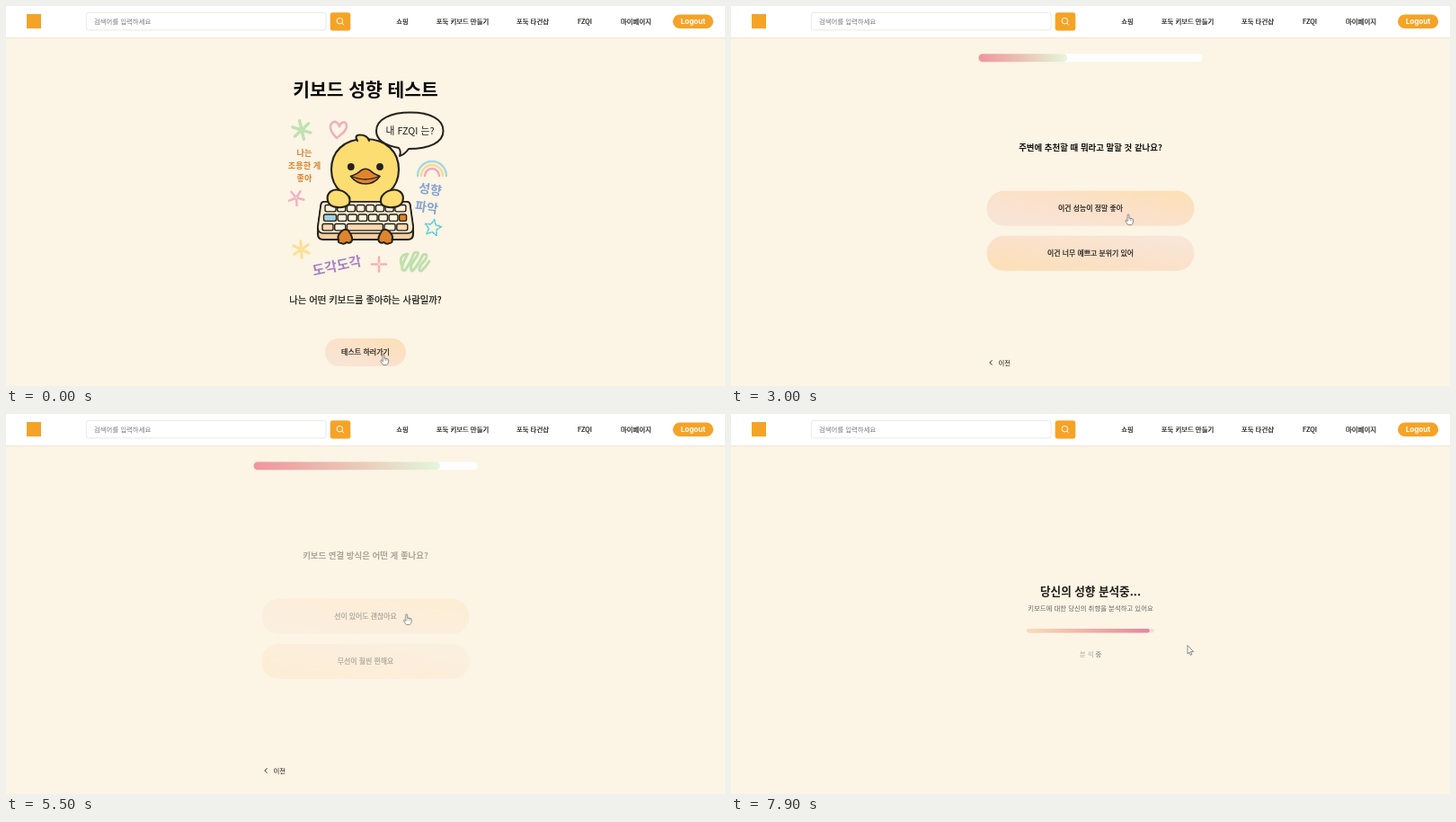
These frames come from a looping animation (800x423 px, 8 s). An HTML page:

```html
<!DOCTYPE html>
<html lang="ko">
<head>
<meta charset="utf-8">
<title>키보드 성향 테스트</title>
<style>
html, body { margin: 0; width: 100%; height: 100%; overflow: hidden; background: #fcf4e4; }
svg { display: block; width: 100%; height: 100%; }
text { font-family: "Noto Sans CJK KR", "Noto Sans CJK", sans-serif; }
.latin { font-family: Inter, sans-serif; }
</style>
</head>
<body>
<svg id="stage" viewBox="0 0 800 423" xmlns="http://www.w3.org/2000/svg"></svg>
<script>
const LOOP = 8000, STEP = 100;
const INK = '#1f1d1b', ORANGE = '#f5a326', LINE = '#25211d', PAPER = '#fcf4e4';

// start time, question, first answer, second answer
const QUESTIONS = [
  [600, '타건음이 잘 들릴 때 집중이 잘 되나요?', '아니요, 조용한 게 더 좋아요', '네, 찰칵찰칵 소리가 좋아요'],
  [1400, '키보드를 고를 때 먼저 보는 것은?', '손에 편한 타건감이에요', '눈에 띄는 디자인이에요'],
  [1900, '조용한 키보드와 반짝이는 키보드 중 고른다면?', '조용한 키보드가 더 좋아요', '시각적으로 화려한 게 더 좋아요'],
  [2400, '새 키보드를 사면 무엇부터 하나요?', '바로 타이핑을 해봐요', '예쁘게 사진을 찍어요'],
  [2800, '주변에 추천할 때 뭐라고 말할 것 같나요?', '이건 성능이 정말 좋아', '이건 너무 예쁘고 분위기 있어'],
  [3300, '키보드를 주로 어디에서 사용하나요?', '사무실에서 사용해요', '내 방에서 사용해요'],
  [3700, '키캡을 바꿔보고 싶은 적이 있나요?', '기본 키캡이면 충분해요', '색깔별로 바꾸고 싶어요'],
  [4200, '거치대, 데스크패드, 무드등... 이런 것들', '없어도 괜찮아요', '있어야 책상이 완성된 느낌이에요'],
  [4700, '키를 누르는 느낌은 어떤 게 좋나요?', '가볍고 부드러운 느낌', '묵직하고 또렷한 느낌'],
  [5100, '키보드의 크기는 어떤 게 좋나요?', '작고 간편한 게 좋아요', '숫자키까지 있어야 해요'],
  [5500, '키보드 연결 방식은 어떤 게 좋나요?', '선이 있어도 괜찮아요', '무선이 훨씬 편해요'],
  [5900, '나에게 키보드란 어떤 의미인가요?', '일을 돕는 도구예요', '나를 보여주는 취향이에요']
];
const RESULT = 6300;

// time, x, y of the pointer tip
const PATH = [[0, 420, 388], [500, 420, 388], [700, 421, 382], [1000, 421, 379], [1300, 426, 282],
  [1400, 427, 274], [1900, 429, 272], [2200, 431, 251], [2400, 436, 240], [2800, 442, 233],
  [3000, 442, 232], [3800, 444, 225], [4500, 445, 221], [6200, 446, 224], [6400, 449, 235],
  [7000, 470, 250], [7900, 508, 258]];

const clamp = v => Math.max(0, Math.min(1, v));
const easeOut = p => 1 - (1 - clamp(p)) ** 2;

// weight 500 gets a hairline stroke to look medium
const text = (s, x, cy, size, fill = INK, weight = 500, anchor = 'middle', extra = '') =>
  `<text x="${x}" y="${cy + size * .37}" font-size="${size}" font-weight="${weight}" fill="${fill}" text-anchor="${anchor}" ` +
  (weight === 500 ? `stroke="${fill}" stroke-width=".22" ` : '') + `${extra}>${s}</text>`;
const rect = (x, y, w, h, r, fill, extra = '') =>
  `<rect x="${x}" y="${y}" width="${w}" height="${h}" rx="${r}" fill="${fill}" ${extra}/>`;
const ellipse = (x, y, rx, ry, fill) =>
  `<ellipse cx="${x}" cy="${y}" rx="${rx}" ry="${ry}" fill="${fill}"/>`;
const path = (d, stroke, w, fill = 'none', extra = '') =>
  `<path d="${d}" stroke="${stroke}" stroke-width="${w}" fill="${fill}" stroke-linecap="round" stroke-linejoin="round" ${extra}/>`;
const gradient = (id, dir, ...colors) =>
  `<linearGradient id="${id}" ${dir}>` +
  colors.map((c, i) => `<stop offset="${i / (colors.length - 1)}" stop-color="${c}"/>`).join('') +
  '</linearGradient>';

function spokes(x, y, r, n, color, w, turn = 0) {
  let d = '';
  for (let i = 0; i < n; i++) {
    const a = turn + i * 2 * Math.PI / n, c = Math.cos(a), s = Math.sin(a);
    d += `M${x + c * 2} ${y + s * 2}L${x + c * r} ${y + s * r}`;
  }
  return path(d, color, w);
}

function star(x, y, r) {
  const points = [];
  for (let i = 0; i < 10; i++) {
    const a = -1.4 + i * Math.PI / 5, k = i % 2 ? r * .48 : r;
    points.push(`${x + Math.cos(a) * k} ${y + Math.sin(a) * k}`);
  }
  return path(`M${points.join('L')}Z`, '#55cbd8', 1.6, 'none', 'stroke-dasharray="2.4 1.8"');
}

function keyRow(y, x, widths, tints) {
  return widths.map((w, i) => {
    const key = rect(x, y, w, 7.4, 1.8, tints[i] || '#fdf1da', `stroke="${LINE}" stroke-width="1.4"`);
    x += w + 1.7;
    return key;
  }).join('');
}

function header() {
  const nav = [['쇼핑', 441], ['포둑 키보드 만들기', 508], ['포둑 타건샵', 586], ['FZQI', 644], ['마이페이지', 701]];
  return rect(0, 35, 800, 1.3, 0, '#f0e9dc') + rect(0, 0, 800, 35, 0, '#fff') +
    rect(23, 9, 16, 16, 0, ORANGE) +
    rect(89.3, 7.4, 266.8, 19.4, 2.5, '#fff', 'stroke="#e4e2df" stroke-width=".8"') +
    text('검색어를 입력하세요', 98, 17, 7.4, '#777', 400, 'start') +
    rect(360.7, 7.2, 22.6, 20.2, 3, ORANGE) +
    '<circle cx="371.4" cy="16.6" r="3.3" fill="none" stroke="#fff"/>' + path('M374 19.2L375.7 20.9', '#fff', 1) +
    nav.map(([s, x]) => text(s, x, 17, 7.4)).join('') +
    rect(742, 9.5, 45, 15.5, 7.75, ORANGE) +
    text('Logout', 764.5, 17.2, 8.1, '#fff', 700, 'middle', 'class="latin"');
}

function duck() {
  const yellow = '#fbdd72', beak = '#df852b', peach = '#f8d9b0';
  const wing = 'M358 217C356 208 363 203 371 205C380 207 384 214 382 220C379 226 360 226 358 217Z';
  const foot = 'M373 251Q377 247 381 250Q386 257 385 261Q383 265 379 263Q376 266 373 264Q369 264 370 260Q368 256 373 251Z';
  const mirror = 'transform="translate(799.5 0) scale(-1 1)"';
  return path('M364 226Q354 205 378 203H421Q444 205 436 226Z', LINE, 2, yellow) +
    path('M399.5 148C424 148 437 163 437 182C437 203 421 216 399.5 216C378 216 362 203 362 182C362 163 375 148 399.5 148Z', LINE, 2.1, yellow) +
    path('M391 150Q387 143.5 394 143.5Q402 143.5 404 150', LINE, 2.1, yellow) +
    rect(383, 198, 34, 20, 6, yellow) +
    ellipse(383.8, 179, 3.9, 4, LINE) + ellipse(416, 179, 3.9, 4, LINE) +
    path('M383.5 189.5Q391 187 395 183Q400 179.5 405 183Q409 187 416 189.5Q410 198 400 198Q390 198 383.5 189.5Z', LINE, 1.6, beak) +
    path('M384 189.5Q393 193 400 193Q407 193 415.5 189.5', LINE, 1.3) +
    path('M354 218H446Q449 218 449.5 221L453 246V254Q453 260 447 260H353Q347 260 347 254V246L350.5 221Q351 218 354 218Z', LINE, 2.1, '#f4cf9f') +
    path('M354 218H446Q449 218 449.5 221L453 246Q453 253 447 253H353Q347 253 347 246L350.5 221Q351 218 354 218Z', LINE, 1.6, '#fbecd2') +
    keyRow(221.5, 355, [12, 9, 9, 9, 9, 9, 9, 12], {}) +
    keyRow(232, 353.5, [14, 9.7, 9.7, 9.7, 9.7, 9.7, 9.7, 8], { 0: '#9fd3df', 7: beak }) +
    keyRow(242.5, 352, [12, 12, 40, 12, 12], { 0: peach, 2: peach, 4: peach }) +
    path(wing, LINE, 2.1, yellow) + path(wing, LINE, 2.1, yellow, mirror) +
    path(foot, LINE, 2, beak) + path(foot, LINE, 2, beak, mirror);
}

function intro() {
  const rainbow = [['#a5d8e0', 16], ['#f8d993', 12], ['#f2aab8', 8]].map(([c, r]) =>
    path(`M${474 - r} 189A${r} ${r} 0 0 1 ${474 + r} 189`, c, 2.4)).join('');
  return text('키보드 성향 테스트', 400, 93.5, 20.4, '#0b0a09', 900) +
    spokes(329, 138, 10.5, 6, '#bfe2b2', 3.4, .3) +
    path('M368 147C361 140 359 134 363 130C367 127 370 131 371 134C373 128 379 128 379 134C379 139 373 143 368 147Z', '#eeb1bd', 2.6) +
    text('나는', 332, 164, 9.2, '#d98230', 700) +
    text('조용한 게', 332, 178, 9.2, '#d98230', 700) +
    text('좋아', 332, 191.5, 9.2, '#d98230', 700) +
    spokes(323, 213.5, 8.5, 5, '#f1b3c2', 2.6, .25) +
    spokes(328.5, 271, 9.5, 6, '#fbdf91', 2.9, .45) +
    text('도각도각', 0, 0, 15, '#a77fc4', 700, 'middle', 'transform="translate(368 289) rotate(-12)"') +
    spokes(415, 287.5, 8, 4, '#f1b3b7', 2.6) +
    path('M440 288Q437 277 447 276Q436 296 444 294Q450 286 454 275Q461 272 457 279Q447 292 452 295Q457 291 464 277Q471 275 466 283Q456 294 462 295Q467 291 471 284', '#bfe0ad', 3) +
    rainbow +
    text('성향', 0, 0, 14, '#86a2d2', 700, 'middle', 'transform="translate(472 204) rotate(8)"') +
    text('파악', 0, 0, 14, '#86a2d2', 700, 'middle', 'transform="translate(468 224) rotate(8)"') +
    star(475, 247, 9.5) + duck() +
    path('M437 158C421 155 412 149 412 139C412 126 428 118.5 450 118.5C472 118.5 486.5 126 486.5 139C486.5 152 471 159 448 159Q444 165 438 167Q440 162 437 158Z', LINE, 2, PAPER) +
    text('내 FZQI 는?', 449.5, 139.5, 10.8, INK, 400) +
    text('나는 어떤 키보드를 좋아하는 사람일까?', 400, 327, 10.4, '#15130f') +
    rect(355, 370, 90, 31, 15.5, 'url(#hover)') +
    text('테스트 하러가기', 400, 385.5, 8);
}

const HEAD = '<defs>' +
  gradient('rest', 'x1="0" y1="1" x2="1" y2="0"', '#fbe0b5', '#fbe1ca', '#f7e7dc') +
  gradient('hover', 'x1="0" y1="1" x2="1" y2="0"', '#f7e5da', '#fbe1ca', '#fbe0b5') +
  gradient('steps', '', '#f0949e', '#eac4b4', '#e3f7dc') +
  gradient('load', '', '#fbdcb6', '#f2b0a5', '#e983a5') +
  '</defs>' + rect(0, 0, 800, 423, 0, PAPER) + header();
const INTRO = intro();

function tipAt(t) {
  let i = 0;
  while (i < PATH.length - 2 && t > PATH[i + 1][0]) i++;
  const [t0, x0, y0] = PATH[i], [t1, x1, y1] = PATH[i + 1], p = clamp((t - t0) / (t1 - t0));
  return [x0 + (x1 - x0) * p, y0 + (y1 - y0) * p];
}

function answer(label, cy, hovered, grow) {
  const k = 1 + .017 * grow;
  return `<g transform="translate(400 ${cy}) scale(${k})">` +
    rect(-115.5, -19.5, 231, 39, 19.5, hovered ? 'url(#hover)' : 'url(#rest)') +
    text(label, 0, 0, 7.9) + '</g>';
}

function quiz(t, index, over, inside) {
  const [start, title, first, second] = QUESTIONS[index], age = t - start;
  const width = 249 / 12 * (index + easeOut(age / 400));
  const grow = inside ? clamp((age - 200) / 100) : 0;
  return rect(275.5, 53.2, 249, 9, 4.5, '#fff') +
    rect(275.5, 53.2, width, 9, 4.5, 'url(#steps)') +
    `<g opacity="${clamp((age + 70) / 200)}">` +
    text(title, 400, 157.5, 9.45, '#141210', 700) +
    answer(first, 225.2, over === 0, over === 0 ? grow : 0) +
    answer(second, 275.3, over === 1, over === 1 ? grow : 0) + '</g>' +
    `<g opacity="${index ? 1 : .5}">` + path('M290.3 394.5L287.8 397L290.3 399.5', INK, .9) +
    text('이전', 297.5, 397, 7.4, INK, 400, 'start') + '</g>';
}

function result(t) {
  const p = clamp((t - RESULT) / 600), fill = clamp((t - 6600) / 1350);
  const letters = [...'분석중'].map((c, i) => {
    const wave = Math.cos(2 * Math.PI * ((t - 7900) / 1200 + (2 - i) / 3));
    return text(c, 391.2 + i * 8.9, 267, 7.4, '#666', 400, 'middle', `opacity="${.5 + .38 * Math.max(0, wave)}"`);
  }).join('');
  return `<g opacity="${p}" transform="translate(0 ${-6 * (1 - p)})">` +
    text('당신의 성향 분석중...', 400, 197, 12.6, INK, 700) +
    text('키보드에 대한 당신의 취향을 분석하고 있어요', 400, 216, 7.4, '#666', 400) + '</g>' +
    `<g opacity="${clamp((t - 6500) / 300)}">` +
    rect(329, 239, 142, 4.6, 2.3, '#e9e3dc') +
    rect(329, 239, 142 * fill, 4.6, 2.3, 'url(#load)') + letters + '</g>';
}

function pointer([x, y], hand) {
  const d = hand
    ? 'M-1 6V.9Q-1 0 0 0Q1 0 1 .9V4.2L4.5 5Q6 5.4 6 7L5.5 10Q5 12 4 12.4H0Q-1 12-2 10L-3.2 8Q-3.6 6.8-2.6 6.6L-1 8Z'
    : 'M0 0V9.6L2.2 7.6L3.6 11L5.2 10.3L3.7 7H6.7Z';
  const folds = hand ? path('M1 4.4V7M2.7 4.8V7M4.4 5.2V7.2', '#777', .5) : '';
  return `<g transform="translate(${x} ${y}) scale(.94)">` + path(d, '#666', .8, '#fff') + folds + '</g>';
}

const stage = document.getElementById('stage');
stage.innerHTML = HEAD + '<g id="scene"></g>';
const scene = document.getElementById('scene');
let shown = -1;

function draw(t) {
  const tip = tipAt(t), y = tip[1];
  const over = y > 200 && y < 253 ? 0 : y >= 253 && y < 297 ? 1 : -1;
  let view, hand;
  if (t < QUESTIONS[0][0]) {
    view = INTRO;
    hand = true;
  } else if (t < RESULT) {
    const index = QUESTIONS.filter(q => q[0] <= t).length - 1;
    const inside = over === 0 ? y < 245 : y > 256;
    view = quiz(t, index, over, inside);
    hand = over >= 0;
  } else {
    view = result(t);
    hand = false;
  }
  scene.innerHTML = view + pointer(tip, hand);
}

const begin = performance.now();
function tick() {
  const t = Math.floor((performance.now() - begin) % LOOP / STEP) * STEP;
  if (t !== shown) draw(shown = t);
  requestAnimationFrame(tick);
}
tick();
</script>
</body>
</html>
```
